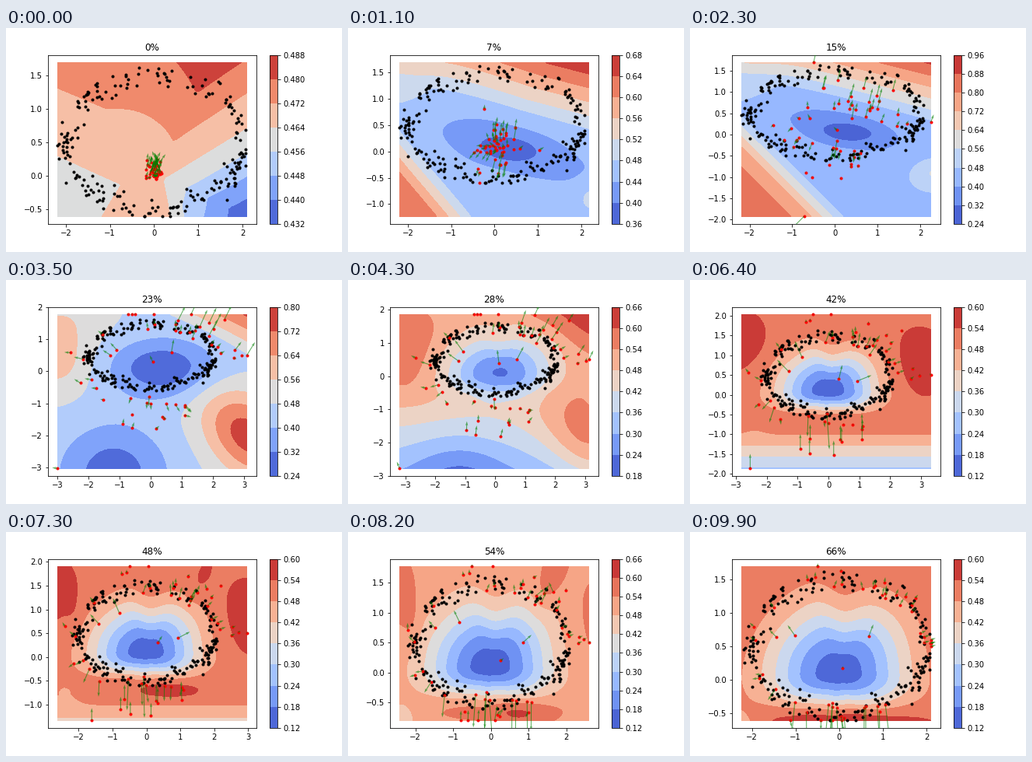
Recreate the animation shown at these times as a matplotlib script. Size 432 by 288 pixels, loop 10 s.

```python
import numpy as np
import matplotlib.pyplot as plt
from matplotlib.animation import FuncAnimation

FRAMES, INTERVAL = 100, 100
KEYS = [0, 23, 35, 52, 64, 82, 99]

# Extent of the data at the key times
LEFT = [-2.19, -2.19, -3.0, -3.43, -2.82, -2.42, -2.24]
RIGHT = [2.1, 2.25, 3.08, 3.17, 3.32, 2.6, 2.1]
BOTTOM = [-0.6, -1.92, -3.03, -2.48, -1.86, -0.8, -0.6]
TOP = [1.69, 1.69, 1.77, 1.95, 2.03, 1.77, 1.69]

rng = np.random.default_rng(4)


def extent(i):
    return [np.interp(i, KEYS, side) for side in (LEFT, RIGHT, BOTTOM, TOP)]


def relu(v):
    return np.maximum(0, v)


def hill(x, y, cx, cy, sx, sy):
    return np.exp(-((x - cx) / sx) ** 2 - ((y - cy) / sy) ** 2)


def bowl(x, y, cy, a, up, down):
    """Dented superellipse, 1 in the middle and 0 far outside."""
    dy = y - cy
    up = up * (1 - 0.1 * np.exp(-((x - 0.1) / 0.4) ** 2))
    h = np.where(dy > 0, up, down)
    r = (np.abs(x / a) ** 2.4 + np.abs(dy / h) ** 2.4) ** (1 / 2.4)
    r = r * (1 + 0.03 * np.sin(5 * np.arctan2(dy, x) + 1))
    return np.exp(-(r / 0.76) ** 2.2)


def untrained(x, y):
    # a cone whose slope depends on the direction alone
    dx, dy = x - 0.08, y - 0.02
    slope = np.interp(np.degrees(np.arctan2(dy, dx)),
                      [-65, -40, -17, 19, 54, 90, 140, 172, 190, 230],
                      [-3.6, -15, -15.8, -1.2, 9, 7, 3.6, -1, -3, 0], period=360)
    return 0.4665 + 1e-3 * np.hypot(dx, dy) * slope


def early(x, y):
    s = -x - y
    tilt = y + 0.2 * (x - 0.3)
    return (0.47 - 0.13 * hill(x, tilt, 0.2, 0.1, 1.6, 0.5)
            - 0.08 * hill(x, y, 0.3, 0.03, 0.7, 0.25)
            + 0.32 * relu(s - 1.7) - 0.28 * relu(s - 2.7)
            + 0.3 * relu(y + 0.25 * x - 0.85)
            + 0.08 * hill(x, y, -2.3, 1.7, 0.9, 0.8)
            + 0.1 * hill(x, y, 2.3, -0.9, 0.4, 0.3))


def spread(x, y):
    return (0.47 - 0.22 * hill(x, y, 0.4, 0.1, 1.7, 0.9)
            + 0.13 * hill(x, y, -3, 0.4, 1.1, 1.1)
            + 0.06 * hill(x, y, -2.8, 1.7, 1.5, 0.8)
            + 0.2 * relu(0.5 * x + y - 2)
            + 0.29 * hill(x + 0.4 * (y + 2), y, 3.1, -2, 1.3, 1.4)
            - 0.2 * hill(x, y, -1.2, -3.2, 1.7, 1.5))


def trained(x, y, q):
    early_on = min(1, 4 * q)
    swell = np.exp(-((q - 0.64) / 0.2) ** 2)
    z = 0.525 - (0.32 + 0.06 * early_on) * bowl(x, y, 0.1, 2.05, 1.25, 0.8 - 0.2 * early_on)
    z = z - (0.16 + 0.06 * early_on) * relu(-y - 0.55 - 0.25 * early_on)
    z = z + 0.05 * (1 - 0.5 * q) * (hill(x, y, -2.8, 1.3, 0.9, 0.8) + hill(x, y, 2.9, 0.8, 1, 0.9))
    z = z + 0.08 * q * hill(x, y, 0.1, -0.6, 1.7, 0.2)
    z = z + swell * (0.05 * hill(x + 0.3 * y, y, -1.9, 1.1, 0.25, 0.6)
                     + 0.07 * hill(x - 0.5 * y, y, 0.8, 1.6, 0.3, 0.5)
                     + 0.06 * hill(x, y, 0.8, -0.7, 0.7, 0.2))
    return z - 0.12 * q * hill(x, y, -2.4, -0.75, 0.5, 0.3)


STAGES = [untrained, early, spread, lambda x, y: trained(x, y, 0)]


def progress(i):
    return max(0, (i - KEYS[3]) / (FRAMES - 1 - KEYS[3]))


def field(x, y, i):
    if i >= KEYS[3]:
        return trained(x, y, progress(i))
    k = np.searchsorted(KEYS, i, side="right") - 1
    w = (i - KEYS[k]) / (KEYS[k + 1] - KEYS[k])
    return (1 - w) * STAGES[k](x, y) + w * STAGES[k + 1](x, y)


def uphill(x, y, i, h=0.04):
    return ((field(x + h, y, i) - field(x - h, y, i)) / (2 * h),
            (field(x, y + h, i) - field(x, y - h, i)) / (2 * h))


# Real samples: a noisy ellipse
theta = rng.uniform(0, 2 * np.pi, 215)
x0, x1, y0, y1 = extent(0)
real_x = np.clip(2 * np.cos(theta) + rng.normal(0, 0.1, theta.size), x0, x1)
real_y = np.clip(0.5 + np.sin(theta) + rng.normal(0, 0.1, theta.size), y0, y1)

# Generated samples: bunches around the ring, a few inside, three at the rim
N = 46
phi = np.radians(rng.normal(rng.choice([22, 90, 180, 270], N, p=[0.36, 0.14, 0.18, 0.32]), 26))
noise = rng.normal(0, 1, (2, N)).clip(-1.8, 1.8)
INNER = np.array([(0.2, 0.3), (0.8, 0.5), (-0.95, 0.8), (-1.35, 0.6)]).T
sway = rng.uniform(0, 2 * np.pi, INNER.shape)


def generated(i):
    x0, x1, y0, y1 = extent(i)
    grow = min(1, i / 30) ** 2
    wide = (x1 - x0) / 4.3
    scale = grow * np.sqrt(wide)
    loose = 0.1 + 0.6 * grow * (wide - 1) + 0.8 * grow * (1 - grow)
    sag = 0.25 * (y0 + 0.6) * relu(-np.sin(phi))
    x = 2 * scale * np.cos(phi) + loose * noise[0]
    y = 0.1 + 0.4 * grow + scale * np.sin(phi) + sag + 0.8 * loose * noise[1]

    inner = grow * (INNER + 0.15 * np.sin(i / 12 + sway))
    corner = np.interp(i, KEYS, [0, 0.33, 1, 1, 0.9, 0.33, 0.5])
    out = min(1, i / KEYS[1])
    rim_x = np.array([corner * x0, out * x1, -0.5 * out])
    rim_y = np.array([y0, 0.5 * grow, y1]) * out
    return (np.concatenate([x.clip(x0, x1), inner[0], rim_x]),
            np.concatenate([y.clip(y0, y1), inner[1], rim_y]))


def padded(lo, hi):
    m = 0.05 * (hi - lo)
    return lo - m, hi + m


fig = plt.figure(figsize=(6, 4), dpi=72, facecolor="white")
fig.subplots_adjust(left=0.125, right=0.9, bottom=0.125, top=0.88)


def draw(i):
    fig.clear()
    ax = fig.add_subplot()
    x0, x1, y0, y1 = extent(i)
    gx, gy = np.meshgrid(np.linspace(x0, x1, 60), np.linspace(y0, y1, 60))
    shades = ax.contourf(gx, gy, field(gx, gy, i), cmap="coolwarm")
    fig.colorbar(shades, ax=ax)

    x, y = generated(i)
    u, v = uphill(x, y, i)
    k = (10 + 7 * progress(i)) / np.hypot(u, v).mean()
    ax.plot(real_x, real_y, ".k")
    ax.plot(x, y, ".r")
    ax.quiver(x, y, u * k, v * k, color="green", alpha=0.6, width=0.004,
              scale=1, scale_units="dots", zorder=3)

    ax.set_xlim(*padded(x0, x1))
    ax.set_ylim(*padded(y0, y1))
    ax.set_title(f"{i * 2 // 3}%")
    return []


anim = FuncAnimation(fig, draw, frames=FRAMES, interval=INTERVAL,
                     init_func=lambda: [], repeat=True, repeat_delay=0)
plt.show()
```
